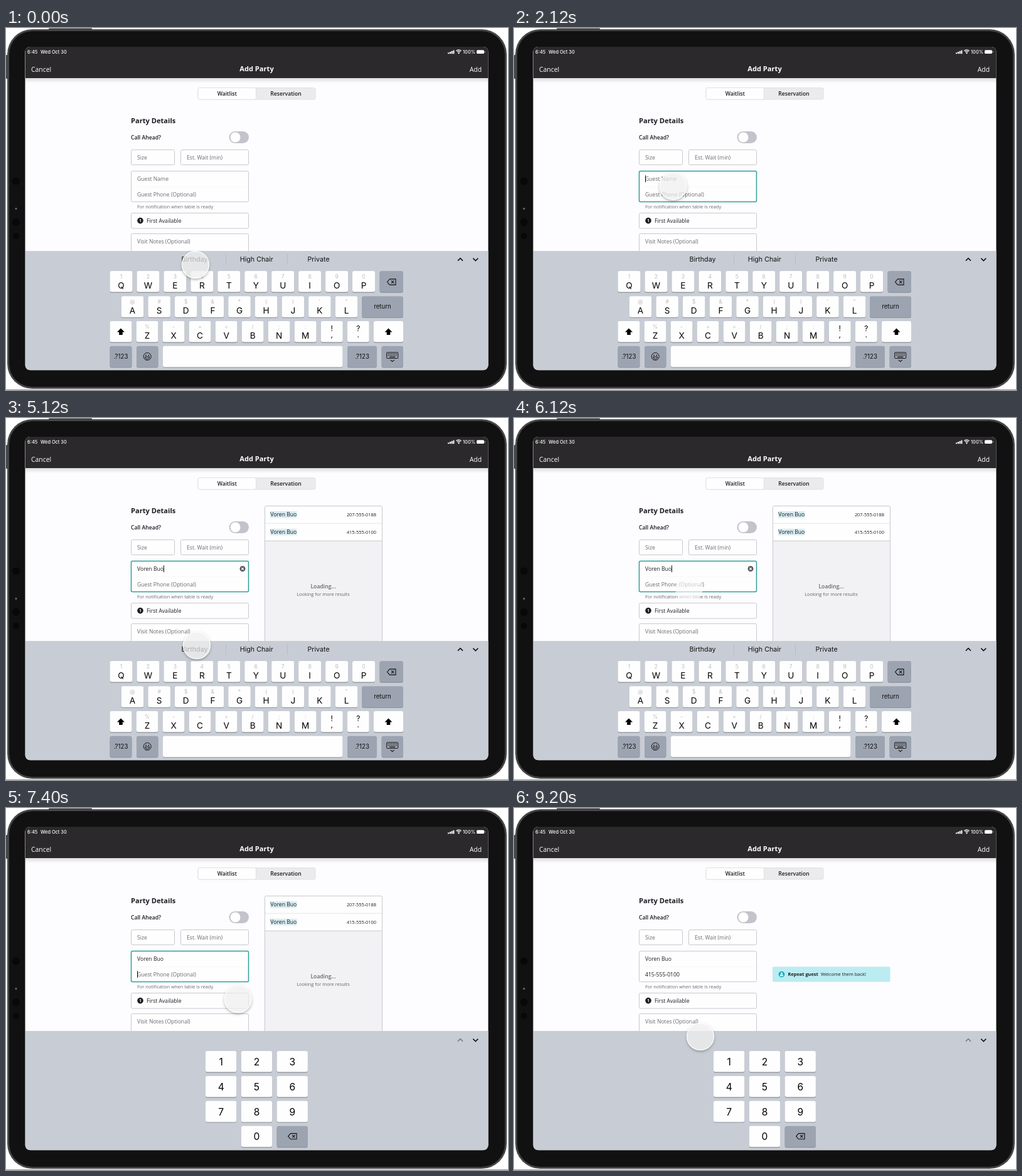
These frames come from a looping animation (800 px wide and 578 px high, 9.32 s). An HTML page with a canvas:

```html
<!DOCTYPE html>
<html lang="en">
<head>
<meta charset="utf-8">
<title>Add Party</title>
<style>
html, body { margin: 0; width: 100%; height: 100%; overflow: hidden; background: #fff; }
canvas { display: block; width: 800px; height: 578px; }
</style>
</head>
<body>
<canvas id="stage"></canvas>
<script>
const LOOP = 9320, W = 800, H = 578;
const SANS = '"Open Sans", "Noto Sans", sans-serif';
const UI = 'Inter, Roboto, sans-serif';
const INK = '#1d1b22', HINT = '#6b6a70', LINE = '#c9c8cd', TEAL = '#2c9f96';
const KEY = '#fefefe', DARK_KEY = '#9da4b1';

const NAME = 'Voren';
const PICK = 'Voren Buo';
const PHONE = '415-555-0100';
const GUESTS = [
  ['Kelmo', '201-555-0122'], ['Vellu', '202-555-0190'],
  ['Dhelnava', '203-555-0155'], ['Glowd', '206-555-0166'],
  ['Buo', '207-555-0188'], ['Buo', PHONE],
  ['Shillibs', '208-555-0144'], ['Mo', '209-555-0133']
];

const cv = document.getElementById('stage');
const c = cv.getContext('2d');
const dpr = window.devicePixelRatio || 1;
cv.width = W * dpr;
cv.height = H * dpr;

const clamp = v => Math.max(0, Math.min(1, v));
const ramp = (t, a, b) => clamp((t - a) / (b - a));
const smooth = u => u * u * (3 - 2 * u);
const out = u => 1 - Math.pow(1 - u, 3.3);

// Touch point moves: start, end, x, y, easing
const START = [302, 378];
const MOVES = [
  [120, 320, 302, 366, smooth],
  [1400, 1800, 248, 240, smooth],
  [2105, 2600, 304, 363, out],
  [5600, 5960, 279, 272, smooth],
  [6400, 6840, 304, 371, out],
  [7160, 7800, 510, 165, smooth],
  [8440, 9200, 297, 365, smooth]
];
// Press: down from, down to, up from, up to
const PRESSES = [[1720, 1800, 2040, 2105], [5860, 5960, 6400, 6480], [7720, 7800, 8040, 8100]];

function text(s, x, y, size, o = {}) {
  c.font = `${o.w || 400} ${size}px ${o.f || SANS}`;
  c.fillStyle = o.c || INK;
  c.textAlign = o.a || 'left';
  c.fillText(s, x, y + size * 0.357);
}

function widthOf(s, size) {
  c.font = `400 ${size}px ${SANS}`;
  return c.measureText(s).width;
}

function box(x, y, w, h, r, fill, stroke, lw = 1) {
  c.beginPath();
  c.roundRect(x, y, w, h, r);
  if (fill) { c.fillStyle = fill; c.fill(); }
  if (stroke) { c.strokeStyle = stroke; c.lineWidth = lw; c.stroke(); }
}

function disc(x, y, r, fill) {
  c.beginPath();
  c.arc(x, y, r, 0, Math.PI * 2);
  c.fillStyle = fill;
  c.fill();
}

function path(pts, color, lw, fill) {
  c.beginPath();
  pts.forEach(([x, y], i) => i ? c.lineTo(x, y) : c.moveTo(x, y));
  if (fill) {
    c.closePath();
    c.fillStyle = color;
    c.fill();
  } else {
    c.strokeStyle = color;
    c.lineWidth = lw;
    c.stroke();
  }
}

function device() {
  c.fillStyle = '#fff';
  c.fillRect(0, 0, W, H);
  c.fillStyle = '#9a9a9c';
  c.fillRect(0, 577, W, 1);
  box(68, 0.5, 69, 4, 1, '#3a3a3c');
  box(0, 43, 5, 38, 1, '#4a4a4c');
  box(2, 2, 796, 574, 40, '#454547');
  box(5, 5, 790, 568, 37, '#111112');
  for (const [y, r] of [[244.5, 6], [310, 6], [332, 5]]) disc(16, y, r, '#08080a');
  disc(16, 288.5, 2, '#34363c');
  disc(16, 288.5, 1, '#8a8e98');
}

function header() {
  c.fillStyle = '#2b292b';
  c.fillRect(31, 30, 738, 50);
  const g = c.createLinearGradient(0, 80, 0, 88);
  g.addColorStop(0, 'rgba(0,0,0,.13)');
  g.addColorStop(1, 'rgba(0,0,0,0)');
  c.fillStyle = g;
  c.fillRect(31, 80, 738, 8);

  const white = { c: '#fff', f: UI, w: 500 };
  text('6:45', 34, 38, 7.4, white);
  text('Wed Oct 30', 55, 38, 7.4, white);
  text('100%', 748, 38, 7.4, { ...white, a: 'right' });
  for (let i = 0; i < 4; i++) box(704 + i * 2.8, 39.3 - i * 1.3, 2, 1.9 + i * 1.3, 0.5, '#fff');
  c.strokeStyle = '#fff';
  c.lineWidth = 1.3;
  for (const r of [3.3, 5.6]) {
    c.beginPath();
    c.arc(721.5, 40.5, r, -Math.PI * 0.76, -Math.PI * 0.24);
    c.stroke();
  }
  disc(721.5, 40, 1.2, '#fff');
  box(750, 35.2, 12, 5.8, 1.6, '#fff');
  box(762.8, 37, 1, 2.2, 0.5, '#bbb');

  text('Cancel', 40, 65.8, 10.4, { c: '#fff' });
  text('Add Party', 399.5, 65.5, 11.1, { c: '#fff', w: 700, a: 'center' });
  text('Add', 758, 65.8, 10.4, { c: '#fff', a: 'right' });
}

function field(x, y, w, h, label, cy, focus) {
  box(x, y, w, h, 2, '#fefefe', focus ? TEAL : LINE, focus ? 1.5 : 1);
  if (label) text(label, x + 9.5, cy, 8.65, { c: HINT });
}

function caret(x, y) {
  c.fillStyle = '#111';
  c.fillRect(x, y - 5.5, 1, 11);
}

function form(t, name) {
  box(306, 95.5, 187, 18.5, 2.5, '#ebeaec', '#e1e0e3');
  box(306, 95.5, 92.5, 18.5, 2.5, '#fefefe', '#e1e0e3');
  text('Waitlist', 352.3, 104.8, 8.65, { w: 600, a: 'center' });
  text('Reservation', 446, 104.8, 8.65, { w: 600, a: 'center' });

  text('Party Details', 199, 147.8, 11.1, { w: 700 });
  text('Call Ahead?', 199, 174.6, 8.65, { w: 600 });
  box(355.5, 165, 31.5, 19, 9.5, '#c4c3cb');
  disc(365.5, 174.5, 8, '#fff');

  field(199.5, 194.5, 69, 24, 'Size', 206.5);
  field(278.5, 194.5, 108, 24, 'Est. Wait (min)', 206.5);

  const nameFocus = t >= 2040 && t < 6200;
  const phoneFocus = t >= 6200 && t < 8040;
  field(199.5, 228.5, 187, 49, '', 0, nameFocus || phoneFocus);
  c.setLineDash([1, 1]);
  path([[209, 253.5], [386, 253.5]], '#ececee', 0.8);
  c.setLineDash([]);
  text(name || 'Guest Name', 209, 240.8, 8.65, { c: name ? INK : HINT });
  const done = t >= 8040;
  text(done ? PHONE : 'Guest Phone (Optional)', 209, 265.6, 8.65, { c: done ? INK : HINT });
  if (nameFocus) caret(209 + widthOf(name, 8.65), 240.8);
  if (phoneFocus) caret(209, 265.6);
  if (nameFocus && name) {
    disc(377, 240.8, 4.5, '#5b5a61');
    path([[375.3, 239.1], [378.7, 242.5]], '#fff', 1.1);
    path([[378.7, 239.1], [375.3, 242.5]], '#fff', 1.1);
  }

  text('For notification when table is ready', 209, 285.3, 7.42, { c: HINT });
  field(199.5, 295.5, 187, 24.5);
  disc(214, 307.6, 4.8, INK);
  text('1', 214, 307.6, 6.2, { c: '#fff', w: 700, a: 'center' });
  text('First Available', 224, 307.8, 8.65);
  field(199.5, 328.5, 187, 45, 'Visit Notes (Optional)', 340.5);
}

function results(t, name) {
  if (t < 2360 || t >= 8040) return;
  c.save();
  c.globalAlpha = ramp(t, 2320, 2480);
  const narrowed = t >= 4120;
  const rows = narrowed ? GUESTS.filter(g => g[0] === 'Buo') : GUESTS;
  const step = 27.85;
  box(412.5, 140.5, 187, 240, 2, narrowed ? '#f2f1f3' : '#fefefe', null);
  rows.forEach(([last, phone], i) => {
    const y = 140.5 + i * step, cy = y + 13.6;
    c.fillStyle = '#fefefe';
    c.fillRect(412.5, y, 187, step);
    path([[412.5, y + step], [599.5, y + step]], LINE, 1);
    c.fillStyle = '#d8ecf1';
    c.fillRect(421, cy - 5.2, widthOf(name, 8.65) + 0.5, 10.6);
    text(NAME + ' ' + last, 421.3, cy, 8.65);
    text(phone, 590, cy + 0.2, 7.42, { a: 'right' });
  });
  box(412.5, 140.5, 187, 240, 2, null, LINE);
  if (narrowed) {
    text('Loading...', 505.5, 268.7, 8.65, { c: '#66656b', w: 600, a: 'center' });
    text('Looking for more results', 505.5, 281.5, 7.42, { c: '#66656b', a: 'center' });
  }
  c.restore();
}

function banner(t) {
  if (t < 8040) return;
  c.save();
  c.globalAlpha = ramp(t, 8040, 8340);
  box(412, 253.5, 187.5, 24, 1.5, '#bbecf1');
  disc(426.5, 265.6, 4.9, '#12b0c2');
  disc(426.5, 264, 1.6, '#fff');
  box(423.9, 266.1, 5.2, 2.5, 1.2, '#fff');
  text('Repeat guest', 436.5, 265.8, 7.42, { w: 700 });
  text('Welcome them back!', 489, 265.8, 7.42);
  c.restore();
}

function key(x, y, w, dark) {
  box(x, y + 1, w, 33.8, 3, '#8b8f97');
  box(x, y, w, 33.6, 3, dark ? DARK_KEY : KEY);
}

function letterRow(letters, subs, first, pitch, w, y) {
  [...letters].forEach((ch, i) => {
    const x = first + i * pitch;
    key(x - w / 2, y, w);
    if (subs[i]) text(subs[i], x, y + 9, 8.6, { f: UI, c: '#bdbdc2', a: 'center' });
    text(ch, x, y + 23.2, 13.6, { f: UI, c: '#000', a: 'center' });
  });
}

function eraseIcon(x, y) {
  path([[x - 7, y], [x - 3, y - 4.6], [x + 6.5, y - 4.6], [x + 6.5, y + 4.6],
    [x - 3, y + 4.6], [x - 7, y], [x - 3, y - 4.6]], '#111', 1.1);
  path([[x - 0.4, y - 2.1], [x + 3.8, y + 2.1]], '#111', 1.1);
  path([[x + 3.8, y - 2.1], [x - 0.4, y + 2.1]], '#111', 1.1);
}

function shiftIcon(x, y) {
  path([[x, y - 5.5], [x + 6, y + 0.6], [x + 2.8, y + 0.6], [x + 2.8, y + 5],
    [x - 2.8, y + 5], [x - 2.8, y + 0.6], [x - 6, y + 0.6]], '#000', 0, true);
}

function hideIcon(x, y) {
  box(x - 9, y - 6.5, 18, 9.5, 1, null, '#111', 1);
  for (let r = 0; r < 2; r++)
    for (let i = 0; i < 6; i++) box(x - 7.2 + i * 2.55, y - 4.7 + r * 2.4, 1.5, 1.3, 0, '#111');
  box(x - 4.6, y + 0.3, 9.2, 1.2, 0, '#111');
  path([[x - 3, y + 5.6], [x, y + 8], [x + 3, y + 5.6]], '#111', 1.1);
}

function smiley(x, y) {
  c.beginPath();
  c.arc(x, y, 6, 0, Math.PI * 2);
  c.strokeStyle = '#111';
  c.lineWidth = 1;
  c.stroke();
  disc(x - 2.1, y - 1.8, 0.9, '#111');
  disc(x + 2.1, y - 1.8, 0.9, '#111');
  c.beginPath();
  c.arc(x, y + 0.6, 3.5, 0, Math.PI);
  c.closePath();
  c.stroke();
}

function letterPad() {
  ['Birthday', 'High Chair', 'Private'].forEach((s, i) =>
    text(s, 300.5 + i * 98.8, 369.6, 10.7, { f: UI, c: '#111', a: 'center' }));
  for (const x of [350.5, 448.5]) path([[x, 361], [x, 378]], '#b7bcc5', 1);

  letterRow('QWERTYUIOP', '1234567890', 183.5, 42.95, 36, 388);
  key(595.5, 388, 37.5, true);
  eraseIcon(614.5, 405.5);
  letterRow('ASDFGHJKL', '@#$&*()\'"', 201.5, 42.63, 35.5, 428.3);
  key(567, 428.3, 66, true);
  text('return', 600, 444.8, 9.7, { f: UI, c: '#111', a: 'center' });
  letterRow('ZXCVBNM', '%-+=/;:', 225, 42.03, 34.8, 468);
  ['!,', '?.'].forEach((pair, i) => {
    const x = 519.3 + i * 42;
    key(x - 17.4, 468, 34.8);
    text(pair[0], x, 479.5, 12, { f: UI, c: '#000', a: 'center' });
    text(pair[1], x, 489.5, 12, { f: UI, c: '#000', a: 'center' });
  });
  key(165.5, 468, 35);
  shiftIcon(183, 485);
  key(586, 468, 47);
  shiftIcon(609.5, 485);
  key(165.5, 507.8, 35, true);
  key(208, 507.8, 34.5, true);
  key(250, 507.8, 286.5);
  key(544, 507.8, 47, true);
  key(598.5, 507.8, 34.5, true);
  for (const x of [183, 567.5]) text('.?123', x, 524.2, 9.7, { f: UI, c: '#111', a: 'center' });
  smiley(225.2, 524.5);
  hideIcon(615.7, 524.5);
}

function numberPad() {
  for (let i = 0; i < 11; i++) {
    const n = i < 9 ? i : i + 1;
    const x = 318 + (n % 3) * 56.8, y = 388 + Math.floor(n / 3) * 39.9;
    key(x, y, 49.3, i === 10);
    if (i === 10) eraseIcon(x + 25, y + 16.5);
    else text(String((i + 1) % 10), x + 24.7, y + 17.2, 15.6, { f: UI, c: '#000', a: 'center' });
  }
}

function keyboard(numeric) {
  c.fillStyle = '#c8cdd5';
  c.fillRect(31, 356, 738, 191);
  const y = numeric ? 370.6 : 369.6;
  path([[720, y + 2], [724, y - 2], [728, y + 2]], numeric ? '#777d86' : '#111', 1.5);
  path([[744.3, y - 2], [748.3, y + 2], [752.3, y - 2]], '#111', 1.5);
  numeric ? numberPad() : letterPad();
}

function touch(t) {
  let [x, y] = START;
  for (const [a, b, tx, ty, ease] of MOVES) {
    const u = ease(ramp(t, a, b));
    x += (tx - x) * u;
    y += (ty - y) * u;
  }
  let press = 0;
  for (const [a, b, d, e] of PRESSES) press = Math.max(press, ramp(t, a, b) - ramp(t, d, e));

  // Shadow only outside the disc, so the fill stays translucent
  c.save();
  c.beginPath();
  c.rect(0, 0, W, H);
  c.arc(x, y, 22, 0, Math.PI * 2, true);
  c.clip('evenodd');
  c.shadowColor = `rgba(0,0,0,${0.34 * (1 - press)})`;
  c.shadowBlur = 4 * dpr;
  c.shadowOffsetY = 2 * dpr;
  disc(x, y, 21.6, `rgba(255,255,255,${1 - press})`);
  c.restore();

  const shade = Math.round(240 + 14 * press);
  disc(x, y, 22, `rgba(${shade},${shade},${shade},${0.72 - 0.1 * press})`);
  c.beginPath();
  c.arc(x, y, 21.5, 0, Math.PI * 2);
  c.strokeStyle = `rgba(255,255,255,${0.8 * (1 - press)})`;
  c.lineWidth = 1.4;
  c.stroke();
}

function typed(t) {
  if (t < 2360) return '';
  if (t < 3560) return NAME.slice(0, 1);
  if (t < 3600) return NAME.slice(0, 3);
  if (t < 4120) return NAME;
  return t < 4800 ? PICK.slice(0, 7) : PICK;
}

function draw(t) {
  const name = typed(t);
  c.setTransform(dpr, 0, 0, dpr, 0, 0);
  device();
  c.save();
  c.beginPath();
  c.roundRect(30.5, 30, 738, 516.3, 8);
  c.clip();
  c.fillStyle = '#fdfcfe';
  c.fillRect(30, 30, 740, 518);
  header();
  form(t, name);
  results(t, name);
  banner(t);
  keyboard(t >= 6200);
  touch(t);
  c.restore();
}

const begin = performance.now();
function tick() {
  draw((performance.now() - begin) % LOOP);
  requestAnimationFrame(tick);
}
tick();
</script>
</body>
</html>
```
